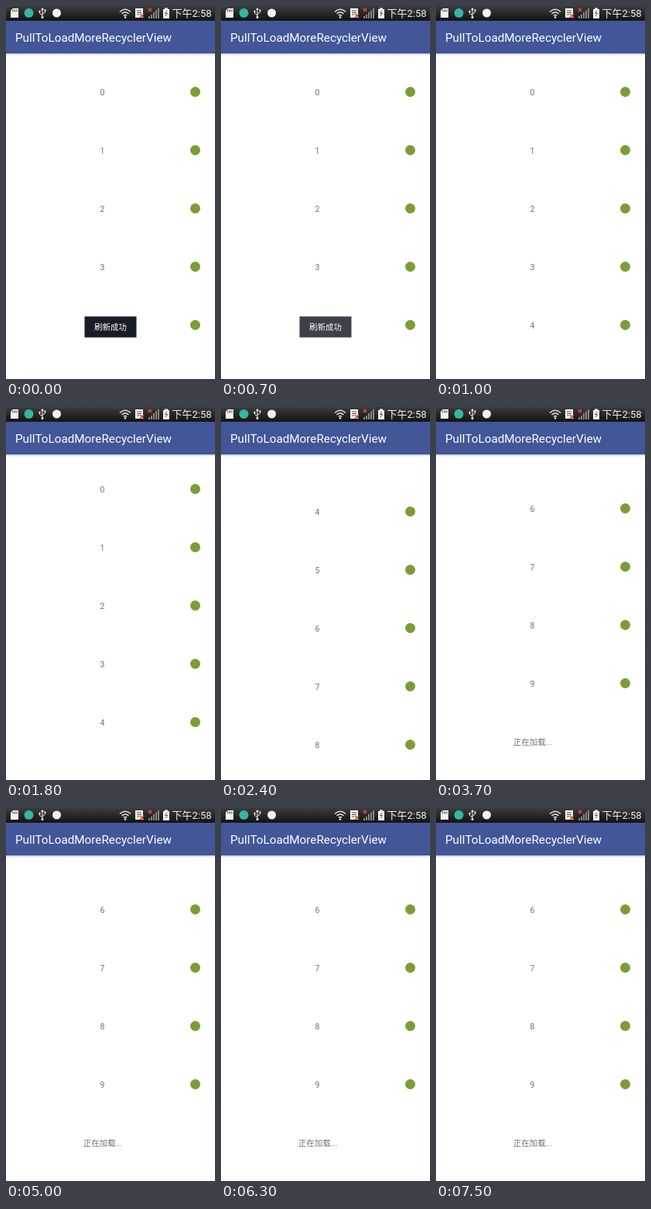
Animation, 270 px wide and 480 px high, one loop 8 s. Source, as an HTML page:

```html
<!DOCTYPE html>
<html lang="zh-CN">
<head>
<meta charset="utf-8">
<title>PullToLoadMoreRecyclerView</title>
<style>
  html, body { margin: 0; width: 100%; height: 100%; overflow: hidden; background: #fff; }
  svg { display: block; }
  text { font-family: Roboto, "Noto Sans CJK SC", "Noto Sans CJK", sans-serif; }
</style>
</head>
<body>
<svg width="270" height="480" viewBox="0 0 270 480">
  <defs>
    <linearGradient id="bar" x2="0" y2="1">
      <stop stop-color="#3c3c3c"/><stop offset="1" stop-color="#131313"/>
    </linearGradient>
    <linearGradient id="shade" x2="0" y2="1">
      <stop stop-color="#c4c8d8"/><stop offset="1" stop-color="#fff"/>
    </linearGradient>
    <clipPath id="view"><path d="M0 72H270V469H0z"/></clipPath>
  </defs>

  <g clip-path="url(#view)">
    <g id="list" font-size="10.5" fill="#707070" text-anchor="middle"></g>
  </g>

  <g id="toast">
    <rect x="101.5" y="399.5" width="67" height="27" fill="#191d26"/>
    <text x="135" y="417" font-size="10.5" fill="#fff" text-anchor="middle">刷新成功</text>
  </g>

  <!-- title bar -->
  <rect y="19" width="270" height="42" fill="#425698"/>
  <rect y="61" width="270" height="3" fill="url(#shade)"/>
  <text x="12" y="45.5" font-size="15.25" fill="#fff">PullToLoadMoreRecyclerView</text>

  <!-- status bar -->
  <rect width="270" height="19" fill="url(#bar)"/>
  <g fill="#f2f2f2">
    <path d="M9 3H16V15H6V6z"/>
    <path d="M9 4.5v3M11.5 4.5v3M14 4.5v3" stroke="#333"/>
    <circle cx="29.5" cy="9" r="6" fill="#35b5a5"/>
    <path d="M47 4V14M47 12L43.5 9.5V7M47 10.5L50.5 8V6" fill="none" stroke="#f2f2f2"/>
    <path d="M47 2l2 3h-4zM49.5 4.5h2v2h-2z"/>
    <circle cx="47" cy="14.5" r="1.5"/><circle cx="43.5" cy="7" r="1.2"/>
    <circle cx="65.5" cy="9" r="5.5"/>

    <path d="M147 7.5Q154 1 161 7.5M149.5 10Q154 6 158.5 10M152 12.5Q154 10.5 156 12.5"
      fill="none" stroke="#e4e4e4" stroke-width="1.6"/>
    <circle cx="154" cy="14.5" r="1.3"/>
    <path d="M167 3H177V15H167z"/>
    <path d="M169 6h6M169 8.5h6M169 11h3" stroke="#555"/>
    <path d="M173 10l5 5m0-5l-5 5M184 3l4 4m0-4l-4 4" stroke="#e04a35" stroke-width="1.6"/>
    <path d="M184 13h2v3h-2zM187 11h2v5h-2zM190 8h2v8h-2zM193 5.5h2v10.5h-2zM196 3h2v13h-2z" fill="#858585"/>
    <path d="M203 4h2V2.5h4V4h2V16h-8z"/>
    <path d="M208 6l-2.5 3.5h3L206 13" fill="none" stroke="#555"/>
    <text x="214.5" y="14" font-size="13">下午2:58</text>
  </g>
</svg>
<script>
const LOOP = 8000, STEP = 100, PITCH = 75, FIRST = 110.5, ROWS = 10, END = 430;
const list = document.getElementById('list');
const toast = document.getElementById('toast');

let rows = '';
for (let i = 0; i < ROWS; i++) {
  const y = FIRST + i * PITCH;
  rows += `<text x="124.5" y="${y + 4}">${i}</text><circle cx="244.5" cy="${y}" r="6.5" fill="#7d9c35"/>`;
}
list.innerHTML = rows + `<text x="125" y="${FIRST + ROWS * PITCH + 4}">正在加载...</text>`;

const clamp = v => Math.min(1, Math.max(0, v));

// Decelerating fling that comes to rest on the footer
function scrollAt(t) {
  if (t < 1800) return 0;
  const left = 1 - clamp((t - 1800) / 1800);
  return Math.round(END - (END - 5) * left ** 2.51);
}

function draw(now) {
  const t = Math.floor(now % LOOP / STEP) * STEP;
  list.setAttribute('transform', `translate(0 ${-scrollAt(t)})`);
  toast.setAttribute('opacity', 1 - clamp((t - 500) / 500) ** 2);
}

const start = performance.now();
function frame() {
  draw(performance.now() - start);
  requestAnimationFrame(frame);
}
frame();
</script>
</body>
</html>
```
